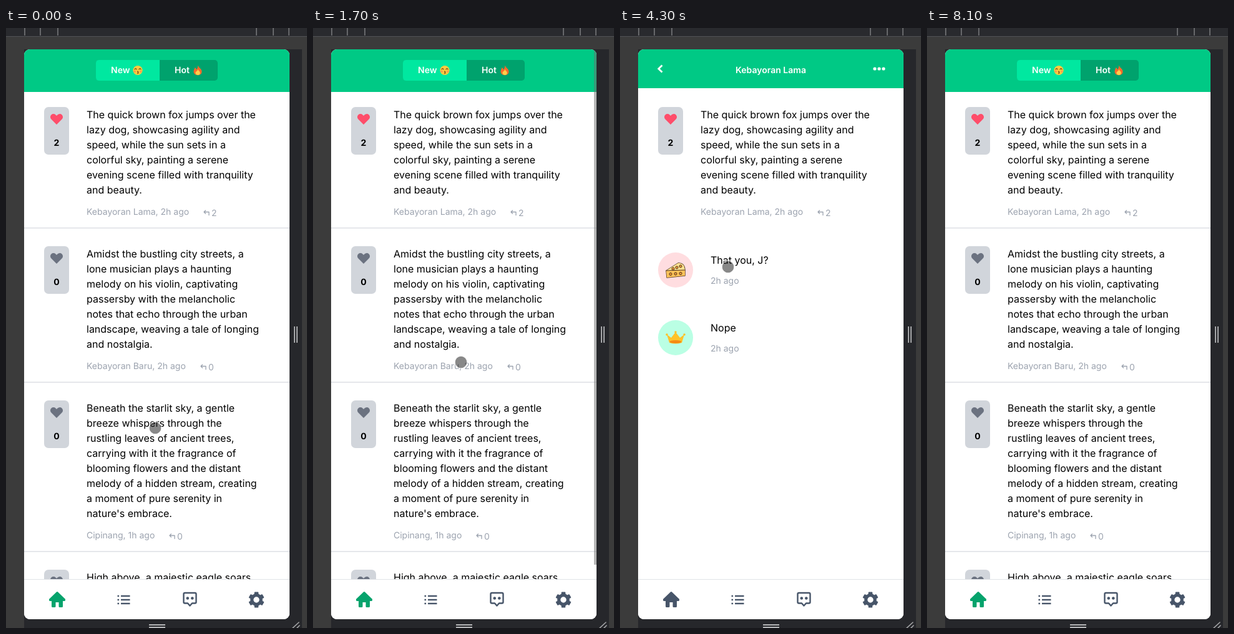
An HTML page that plays this animation: 482 px wide and 957 px high, repeating every 8.4 s.

```html
<!DOCTYPE html>
<html lang="en">
<head>
<meta charset="utf-8">
<title>Feed</title>
<style>
  html, body { margin: 0; width: 100%; height: 100%; overflow: hidden; background: #3b3b3b; }
  svg { display: block; }
  text { font: 16px Inter, sans-serif; fill: #000; text-rendering: geometricPrecision; }
  .meta { font-size: 14px; fill: #9ca3af; }
  .count { font-size: 14px; font-weight: 700; text-anchor: middle; }
  .title { font-size: 14px; font-weight: 600; fill: #fff; }
  .center { text-anchor: middle; }
  .size { font: 14px Roboto, sans-serif; fill: #333; }
  .line { fill: none; stroke-linecap: round; stroke-linejoin: round; }
</style>
</head>
<body>
<svg id="stage" width="482" height="957" viewBox="0 0 482 957"></svg>
<script>
const GREEN = '#00c985', SLATE = '#475569';
const LOOP = 8400, STEP = 100, MAX_SCROLL = 91;

const posts = [
  { likes: 2, replies: 2, place: 'Kebayoran Lama, 2h ago', lines: [
    'The quick brown fox jumps over the', 'lazy dog, showcasing agility and',
    'speed, while the sun sets in a', 'colorful sky, painting a serene',
    'evening scene filled with tranquility', 'and beauty.'] },
  { likes: 0, replies: 0, place: 'Kebayoran Baru, 2h ago', lines: [
    'Amidst the bustling city streets, a', 'lone musician plays a haunting',
    'melody on his violin, captivating', 'passersby with the melancholic',
    'notes that echo through the urban', 'landscape, weaving a tale of longing', 'and nostalgia.'] },
  { likes: 0, replies: 0, place: 'Cipinang, 1h ago', lines: [
    'Beneath the starlit sky, a gentle', 'breeze whispers through the',
    'rustling leaves of ancient trees,', 'carrying with it the fragrance of',
    'blooming flowers and the distant', 'melody of a hidden stream, creating',
    'a moment of pure serenity in', "nature's embrace."] },
  { likes: 0, replies: 0, place: 'Menteng, 1h ago', lines: [
    'High above, a majestic eagle soars', 'effortlessly through the boundless',
    'sky, a symbol of freedom and grace', 'in its solitary flight among the', 'clouds.'] }
];

// Pointer strokes: start, end, destination
const strokes = [
  [0, 0, 239, 638],
  [200, 800, 293, 346],
  [1000, 1700, 237, 533],
  [1900, 2400, 259, 341],
  [2700, 2900, 265, 242],
  [3300, 3400, 227, 213],
  [3400, 3900, 217, 282],
  [3900, 4500, 157, 416],
  [4500, 4900, 219, 420],
  [4900, 5300, 142, 145],
  [5300, 5800, 54, 66],
  [6000, 6200, 64, 62],
  [7300, 7600, 73, 88],
  [7600, 8000, 56, 12]
];

const rect = (x, y, w, h, fill, r = 0) => `<rect x="${x}" y="${y}" width="${w}" height="${h}" fill="${fill}" rx="${r}"/>`;
const circle = (x, y, r, fill) => `<circle cx="${x}" cy="${y}" r="${r}" fill="${fill}"/>`;
const path = (d, fill) => `<path d="${d}" fill="${fill}"/>`;
const line = (d, color, width) => `<path class="line" d="${d}" stroke="${color}" stroke-width="${width}"/>`;
const text = (x, y, s, cls = '') => `<text x="${x}" y="${y}" class="${cls}">${s}</text>`;
const at = (x, y, body, scale = 1) => `<g transform="translate(${x} ${y}) scale(${scale})">${body}</g>`;
const each = (list, draw) => list.map(draw).join('');

const pen = document.createElement('canvas').getContext('2d');
pen.font = '14px Inter, sans-serif';
const metaWidth = s => Math.round(pen.measureText(s).width);

const heart = color => path('M3.172 5.172a4 4 0 0 1 5.656 0L10 6.343l1.172-1.171a4 4 0 1 1 5.656 5.656L10 17.657l-6.828-6.829a4 4 0 0 1 0-5.656z', color);

function post({ likes, place, replies, lines }, top, divider = true) {
  const end = top + 28 + lines.length * 24;
  const replyX = 129 + metaWidth(place) + 23;
  return rect(61, top + 28, 40, 76, '#d1d5db', 7)
    + at(68.5, top + 34, heart(likes ? '#ff4d6a' : '#6b7280'), 1.25)
    + text(81, top + 90, likes, 'count')
    + each(lines, (s, i) => text(129, top + 46 + i * 24, s))
    + text(129, end + 28, place, 'meta')
    + line(`M${replyX + 3.5} ${end + 21}l-2.5 2.5l2.5 2.5M${replyX + 1} ${end + 23.5}h8v5`, '#9ca3af', 1.3)
    + text(replyX + 13, end + 30, replies, 'meta')
    + (divider ? rect(29, end + 48, 425, 2, '#e5e7eb') : '');
}

function postList() {
  let top = 98;
  return each(posts, p => {
    const body = post(p, top);
    top += 78 + p.lines.length * 24;
    return body;
  });
}

const kissFace = circle(0, 0, 7.6, '#ffcb3d') + circle(-4.8, 1.8, 1.8, '#ff9c55') + circle(4.8, 1.8, 1.8, '#ff9c55')
  + line('M-5.2 -1.5q1.8 -2.2 3.4 0M1.8 -1.5q1.8 -2.2 3.4 0M-.5 1.5q2.6 .6 .3 1.8q2.6 .8 -.2 2', '#69401a', 1.1);
const fire = path('M0-8C1-4 7-2 6.5 3C6.2 7 3 8.2 0 8.2S-6.5 6.5-6.5 2.5C-6.5 0-5-1.5-4.5-4C-3-3-2.5-2-2-.5C0-3 .5-5 0-8z', '#ff6a2b')
  + path('M.5-1C1 1.5 4 2 3.8 4.8S1.8 8 0 8S-3.8 7-3.6 4.6S-1 2.5 .5-1z', '#ffcf4a');
const hole = (x, y) => `<circle cx="${x}" cy="${y}" r="2.1" fill="#f09a35" stroke="#4a3320"/>`;
const cheese = line('M-15 1L4-11Q14-12 15 0V9L-14 12z', '#4a3320', 1.4)
  + path('M-15 1L4-11Q14-12 15 0z', '#ffe391') + path('M-15 1L15 0V9L-14 12z', '#ffc35a')
  + line('M-15 1L15 0', '#4a3320', 1.2)
  + each([0, 1, 2], i => hole(-4 + 6 * i, -2 - 2 * i) + hole(-8 + 8 * i, 6.5 - .5 * i));
const crown = path('M-14-5L-7 0L0-9L7 0L14-5L10 8Q0 11-10 8z', '#ffc229')
  + each([-14, 0, 14], x => circle(x, x ? -5 : -9, 1.8, '#ffc229'))
  + '<ellipse cy="6.5" rx="9.5" ry="2.6" fill="#f58a13"/>';
const gear = `<circle r="7.3" fill="none" stroke="${SLATE}" stroke-width="5.2"/>`
  + each([0, 1, 2, 3, 4, 5], i => `<g transform="rotate(${i * 60})">${rect(-3.3, -12.6, 6.6, 5, SLATE, 1)}</g>`);

const reply = (y, color, icon, words) => circle(89, y, 28, color) + at(89, y, icon)
  + text(145, y - 10, words) + text(145, y + 22, '2h ago', 'meta');

const backdrop = rect(0, 0, 482, 957, '#3b3b3b') + rect(0, 0, 482, 13, '#292a2e') + rect(0, 13, 482, 1, '#515256')
  + each([30, 55, 83, 401, 428, 453], x => rect(x - .8, 0, 1.6, 12, '#77787b'))
  + rect(29, 34, 445, 923, '#26272b')
  + each([461, 465], x => rect(x, 476, 2, 26, '#a5a6a8'))
  + each([951, 955], y => rect(229, y, 26, 2, '#b5b6b8'))
  + line('M458 958L469 948M465 958L470 953', '#a5a6a8', 1.6);

const feed = `<g id="feed"><g id="list">${postList()}</g>`
  + rect(29, 34, 425, 68, GREEN)
  + rect(144, 51, 195, 33, '#00a26d', 5) + path('M149 51H246V84H149Q144 84 144 79V56Q144 51 149 51z', '#00e8a0')
  + text(168, 72, 'New', 'title') + at(211, 67.5, kissFace)
  + text(270, 72, 'Hot', 'title') + at(307, 67, fire)
  + `<g id="tap">${rect(29, 98, 425, 222, 'rgba(48,176,218,.57)')}</g></g>`;

const thread = '<g id="thread">' + post(posts[0], 98, false)
  + rect(29, 34, 425, 62, GREEN)
  + '<path d="M67.5 59.5L61.8 65L67.5 70.5" fill="none" stroke="#fff" stroke-width="2.8"/>'
  + text(241.5, 72, 'Kebayoran Lama', 'title center')
  + each([408, 415, 422], x => circle(x, 65, 2.6, '#fff'))
  + reply(386, '#ffdde0', cheese, 'That you, J?') + reply(494, '#baffe4', crown, 'Nope') + '</g>';

const nav = rect(29, 879, 425, 64, '#fff') + rect(29, 879, 425, 1, '#e0e3e7')
  + '<path id="home" d="M82 900.5L70.5 911.5V912.5H74.5V922.5H78V914.5H86V922.5H89.5V912.5H93.5V911.5z" stroke-width="3" stroke-linejoin="round"/>'
  + each([906, 912, 918], y => rect(178.5, y - 1.2, 2.6, 2.4, SLATE) + rect(184, y - 1.2, 14.5, 2.4, SLATE))
  + line('M286.5 901H302.5Q304.5 901 304.5 903V915.5Q304.5 917.5 302.5 917.5H298L294.5 921.5L291 917.5H286.5Q284.5 917.5 284.5 915.5V903Q284.5 901 286.5 901z', SLATE, 2.4)
  + circle(290.8, 909.5, 2.3, SLATE) + circle(298.3, 909.5, 2.3, SLATE)
  + at(401, 912, gear);

document.getElementById('stage').innerHTML = backdrop
  + `<clipPath id="screen">${rect(29, 34, 425, 909, '#000', 9)}</clipPath>`
  + `<g clip-path="url(#screen)">${rect(29, 34, 425, 909, '#fff')}${feed}${thread}${nav}`
  + `<g id="bar">${rect(450, 35, 4, 821, 'rgba(110,110,110,.5)')}</g>`
  + `<g id="size">${rect(351, 34, 103, 25, 'rgba(255,255,255,.8)')}${text(357, 52, '425px × 909px', 'size')}</g></g>`
  + '<g id="cursor"><circle r="9.5" fill="rgba(30,30,30,.53)"/><circle r="10" fill="none" stroke="rgba(255,255,255,.6)" stroke-width="1.3"/></g>';

const [feedEl, listEl, tapEl, threadEl, homeEl, barEl, sizeEl, cursorEl] =
  ['feed', 'list', 'tap', 'thread', 'home', 'bar', 'size', 'cursor'].map(id => document.getElementById(id));

const show = (node, on) => node.setAttribute('visibility', on ? 'visible' : 'hidden');
const move = (node, x, y) => node.setAttribute('transform', `translate(${Math.round(x)} ${Math.round(y)})`);
const within = (t, from, to) => t >= from && t < to;
const ramp = (t, from, to) => Math.min(1, Math.max(0, (t - from) / (to - from || 1)));
const smooth = f => f * f * (3 - 2 * f);

function pointer(t) {
  let [, , x, y] = strokes[0];
  for (const [from, to, toX, toY] of strokes) {
    const f = smooth(ramp(t, from, to));
    x += (toX - x) * f;
    y += (toY - y) * f;
  }
  return [x, y];
}

function draw(now) {
  const t = Math.floor(now % LOOP / STEP) * STEP;
  const inThread = within(t, 3300, 6600);
  const scrolled = ramp(t, 200, 400) - ramp(t, 1100, 1400);
  const barOpacity = ramp(t, 200, 300) - ramp(t, 800, 1000) + ramp(t, 1100, 1200) - ramp(t, 2200, 2400);
  const homeColor = inThread ? SLATE : '#05a36c';

  show(feedEl, !inThread);
  show(threadEl, inThread);
  show(tapEl, within(t, 3100, 3300));
  show(sizeEl, within(t, 3300, 3900));
  show(cursorEl, t < 8100);
  move(listEl, 0, -MAX_SCROLL * scrolled);
  move(barEl, 0, 83 * scrolled);
  move(cursorEl, ...pointer(t));
  barEl.setAttribute('opacity', barOpacity);
  homeEl.setAttribute('fill', homeColor);
  homeEl.setAttribute('stroke', homeColor);
}

const start = performance.now();
function tick() {
  draw(performance.now() - start);
  requestAnimationFrame(tick);
}
tick();
</script>
</body>
</html>
```
